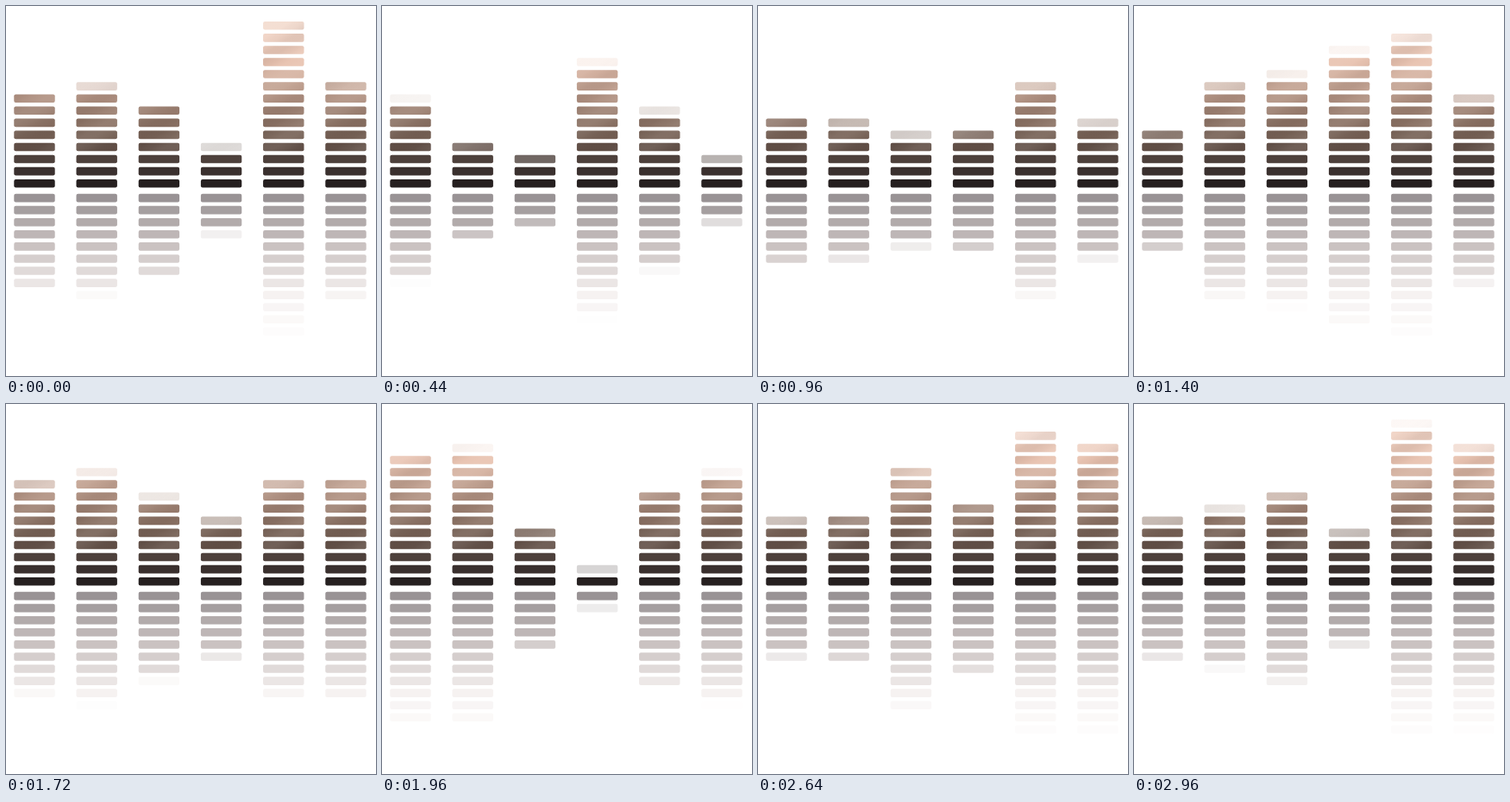
Recreate the animation shown at these times as an HTML page with a canvas. Size 429x429 px, loop 3000 ms.

```html
<!DOCTYPE html>
<html lang="en">
<head>
<meta charset="utf-8">
<title>Equalizer</title>
<style>
html, body { margin: 0; width: 100%; height: 100%; overflow: hidden; background: #fff; }
canvas { display: block; width: 100vw; height: 100vh; }
</style>
</head>
<body>
<canvas id="stage" width="429" height="429"></canvas>
<script>
const ctx = document.getElementById('stage').getContext('2d');
const SIZE = 429, LOOP = 3000, STEP = 40, COLS = 6, ROWS = 15;
const LEFT = 9.3, BASE = 200.9, MIRROR_BASE = 217.8;
const BAR_W = 47.4, BAR_H = 9.6, PITCH_X = 72.2, PITCH_Y = 14.07;

// Evenly spaced colour stops, from the baseline outwards
const MAIN = { span: 5, stops: [[38, 32, 32], [138, 114, 101], [232, 195, 177], [251, 238, 230]] };
const MIRROR = { span: 4, stops: [[153, 147, 149], [202, 194, 193], [246, 242, 241], [255, 255, 255]] };

// Key poses: time, then the height of each column in bars
const POSES = [
  [0, 8, 8.4, 7, 3.2, 14, 8.8],
  [440, 7.1, 3.8, 2.8, 10.2, 6.2, 2.4],
  [960, 5.9, 5.5, 4.3, 4.8, 8.6, 5.3],
  [1400, 4.8, 8.6, 9.2, 11.2, 12.6, 7.5],
  [1960, 10.9, 11.2, 4.8, 1.2, 7.9, 9.1],
  [2320, 7.2, 3.9, 11.2, 11.3, 11.2, 11],
  [2960, 5.5, 6.2, 7.6, 4.4, 13.2, 11.6]
];

const mix = (a, b, u) => a + (b - a) * u;
const ease = u => u * u * (3 - 2 * u);

function shade({ span, stops }, row) {
  const i = Math.min(Math.floor(row / span), stops.length - 2);
  const u = Math.min(1, row / span - i);
  return `rgb(${stops[i].map((v, n) => Math.round(mix(v, stops[i + 1][n], u)))})`;
}

// Regular diagonal bands across the whole stage
function makeSheen() {
  const slope = 1.6, length = SIZE * (1 + slope), period = 115, darkest = 512;
  const k = length / (1 + slope * slope);
  const g = ctx.createLinearGradient(0, 0, k, k * slope);
  for (let s = 0; s <= length; s += period / 8) {
    const dark = Math.cos(2 * Math.PI * (s - darkest) / period);
    const tone = dark > 0 ? '70,40,28' : '255,240,230';
    g.addColorStop(s / length, `rgba(${tone},${Math.abs(dark) * 0.1})`);
  }
  return g;
}
const sheen = makeSheen();

// Eases between poses, with a small wobble that fades out at each pose
function level(col, t) {
  const i = Math.max(1, POSES.findIndex(p => p[0] >= t));
  const a = POSES[i - 1], b = POSES[i];
  const u = (t - a[0]) / (b[0] - a[0]);
  const wobble = Math.sin(Math.PI * u) * Math.sin(t / 110 + col * 2);
  return mix(a[col + 1], b[col + 1], ease(u)) + wobble;
}

function bar(col, y, colour, shiny) {
  ctx.beginPath();
  ctx.roundRect(LEFT + col * PITCH_X, y, BAR_W, BAR_H, 2);
  ctx.fillStyle = colour;
  ctx.fill();
  if (shiny) {
    ctx.fillStyle = sheen;
    ctx.fill();
  }
}

function draw(now) {
  const t = Math.floor(now % LOOP / STEP) * STEP;
  ctx.clearRect(0, 0, SIZE, SIZE);
  for (let col = 0; col < COLS; col++) {
    const height = level(col, t);
    for (let row = 0; row < ROWS && row < height; row++) {
      ctx.globalAlpha = Math.min(1, height - row);
      bar(col, BASE - row * PITCH_Y, shade(MAIN, row), row > 2);
      bar(col, MIRROR_BASE + row * PITCH_Y, shade(MIRROR, row), false);
    }
  }
  requestAnimationFrame(draw);
}
requestAnimationFrame(draw);
</script>
</body>
</html>
```
